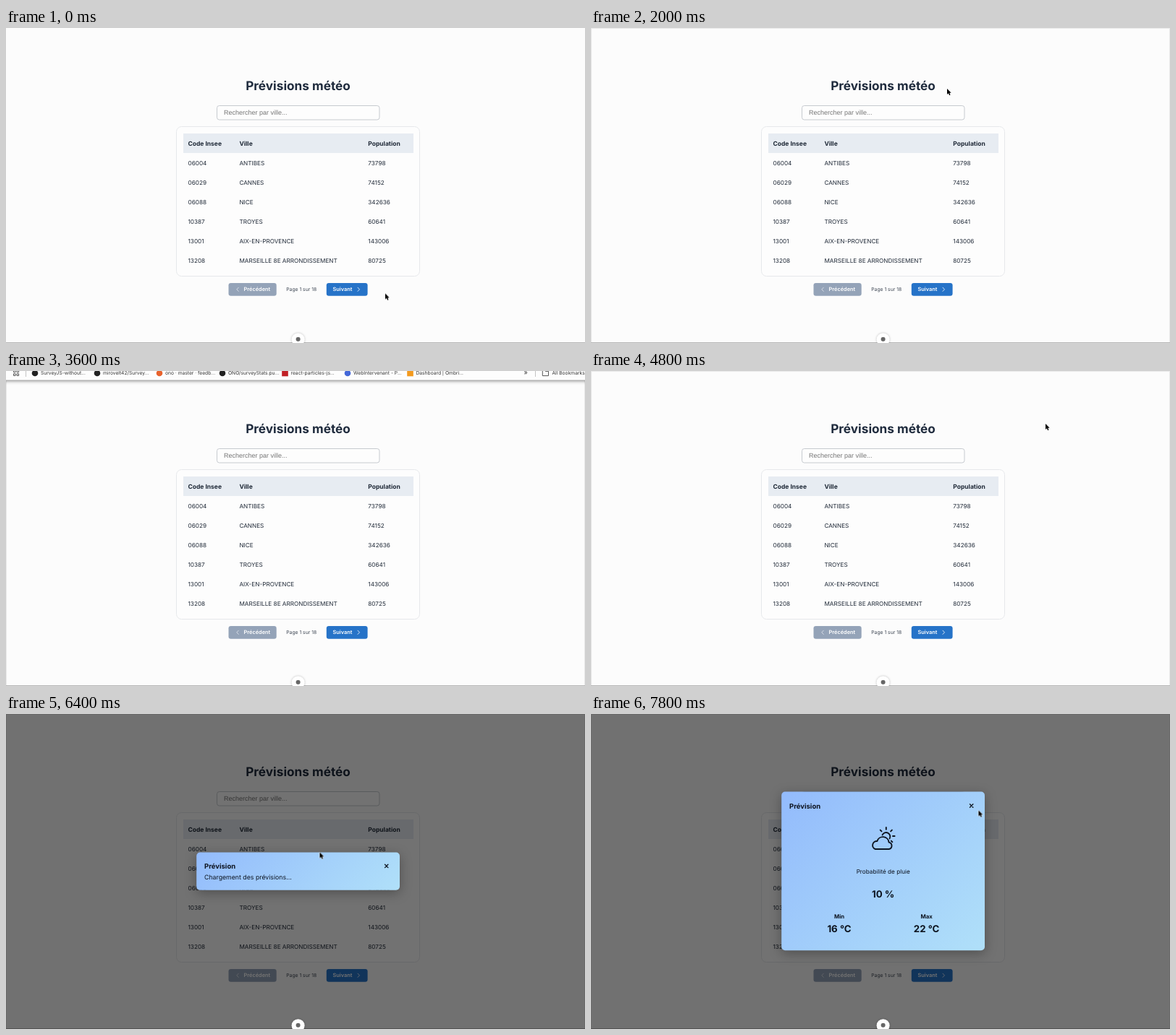
Animation, 800 px wide and 436 px high, one loop 8000 ms. Source, as an HTML page:

```html
<!DOCTYPE html>
<html lang="fr">
<head>
<meta charset="utf-8">
<title>Prévisions météo</title>
<style>
  html, body { margin: 0; width: 100%; height: 100%; overflow: hidden; background: #fcfcfc; }
  svg { display: block; width: 100vw; height: 100vh; }
  text { font-family: Inter, "Open Sans", sans-serif; font-size: 8.2px; fill: #202a38; text-rendering: geometricPrecision; }
  .mid { text-anchor: middle; }
  .title { font-size: 17.2px; font-weight: 700; fill: #1f2b3d; }
  .hint { font: 9px "Liberation Sans", Arial, sans-serif; fill: #757575; }
  .head { font-size: 8.5px; font-weight: 700; }
  .btn { font-size: 7.4px; font-weight: 600; fill: #fff; }
  .page { font-size: 6.8px; fill: #3d4653; }
  .bar text { font-size: 6.7px; fill: #333; }
  .modal text { fill: #0d1420; }
  .modal .name { font-size: 9.5px; font-weight: 700; }
  .modal .wait { font-size: 8.75px; }
  .modal .value { font-size: 13.3px; font-weight: 700; }
  .modal .label { font-size: 7.8px; font-weight: 700; }
  .modal rect { filter: drop-shadow(0 4px 8px rgba(0, 0, 0, .3)); }
  .line { fill: none; stroke-linecap: round; stroke-linejoin: round; }

  .edges, .hover, .hand, .arrow, .shade, .loading, .result, .bar { animation: 8s step-end infinite; }
  .edges { animation-name: edges; }
  .hover, .hand { animation-name: pointing; }
  .arrow { animation-name: arrow; }
  .shade { animation-name: shade; }
  .loading { animation-name: loading; }
  .result { animation-name: result; }
  .bar { animation-name: bar; }
  .cursor { animation: move 8s infinite; }

  @keyframes edges { 0% { opacity: 0 } 10%, 100% { opacity: 1 } }
  @keyframes pointing { 0% { opacity: 0 } 75% { opacity: 1 } 80%, 100% { opacity: 0 } }
  @keyframes arrow { 0% { opacity: 1 } 75% { opacity: 0 } 80%, 100% { opacity: 1 } }
  @keyframes shade { 0% { opacity: 0 } 80%, 100% { opacity: 1 } }
  @keyframes loading { 0% { opacity: 0 } 80% { opacity: 1 } 85%, 100% { opacity: 0 } }
  @keyframes result { 0% { opacity: 0 } 85%, 100% { opacity: 1 } }
  @keyframes bar {
    0% { transform: translateY(-24px) }
    45% { transform: translateY(0) }
    47.5% { transform: translateY(5px) }
    55% { transform: translateY(-7px) }
    57.5%, 100% { transform: translateY(-24px) }
  }
  /* the pointer advances once every 200 ms */
  @keyframes move {
    0% { transform: translate(524px, 367.5px); animation-timing-function: steps(1) }
    7.5% { transform: translate(524px, 367.5px); animation-timing-function: steps(7) }
    25% { transform: translate(492px, 84px); animation-timing-function: steps(2) }
    30% { transform: translate(300px, 70px); animation-timing-function: steps(3) }
    37.5% { transform: translate(535px, 62px); animation-timing-function: steps(3) }
    45% { transform: translate(620px, -14px); animation-timing-function: steps(1) }
    52.5% { transform: translate(620px, -14px); animation-timing-function: steps(3) }
    60% { transform: translate(628px, 73px); animation-timing-function: steps(7) }
    77.5% { transform: translate(433.5px, 191.5px); animation-timing-function: steps(1) }
    82.5% { transform: translate(433.5px, 191.5px); animation-timing-function: steps(6) }
    97.5%, 100% { transform: translate(535.5px, 133.5px) }
  }
</style>
</head>
<body>
<svg viewBox="0 0 800 436" preserveAspectRatio="none">
  <defs>
    <linearGradient id="small" gradientUnits="userSpaceOnUse" x1="320.5" y1="135" x2="486.5" y2="301">
      <stop stop-color="#93bbfc"/><stop offset="1" stop-color="#b0e0f9"/>
    </linearGradient>
    <linearGradient id="large" gradientUnits="userSpaceOnUse" x1="278.5" y1="92.5" x2="528.5" y2="342.5">
      <stop stop-color="#93bbfc"/><stop offset="1" stop-color="#b0e0f9"/>
    </linearGradient>
    <path id="close" class="line" d="M-2.2-2.2 2.2 2.2M2.2-2.2-2.2 2.2" stroke="#0d1420" stroke-width="1.3"/>
  </defs>

  <rect width="800" height="436" fill="#fcfcfc"/>
  <path class="edges" d="M.5 0V436M799.5 0V436M0 .5H800" fill="none" stroke="#e9e9e9"/>
  <path d="M0 435.5H800" stroke="#b4b4b4"/>

  <text class="title mid" x="403.5" y="86">Prévisions météo</text>
  <rect x="291.5" y="107.5" width="224.5" height="19.5" rx="3.2" fill="#fdfdfd" stroke="#c6cacf"/>
  <text class="hint" x="301" y="120.3">Rechercher par ville...</text>

  <rect x="235.5" y="136.5" width="336" height="207" rx="7" fill="#fdfdfd" stroke="#e6e8eb"/>
  <rect x="245" y="146" width="318" height="27" fill="#e7ecf2"/>
  <rect class="hover" x="245" y="173" width="318" height="27" fill="#f3f4f6"/>
  <g id="table"></g>

  <rect x="307.5" y="353" width="66.2" height="17.7" rx="3.2" fill="#94a3b8"/>
  <path class="line" d="M321.3 359.2 318.8 361.8 321.3 364.4" stroke="#e6eaf0" stroke-width=".8"/>
  <text class="btn" x="328.5" y="364.4">Précédent</text>
  <text class="page mid" x="408.2" y="364.2">Page 1 sur 18</text>
  <rect x="442.8" y="353" width="56.8" height="17.7" rx="3.2" fill="#2673c8"/>
  <text class="btn" x="451.5" y="364.4">Suivant</text>
  <path class="line" d="M486 359.2 488.5 361.8 486 364.4" stroke="#fff" stroke-width=".8"/>

  <g class="bar">
    <rect x="-5" y="-20" width="810" height="33" fill="#fdfdfd" stroke="#a9a9a9" style="filter: drop-shadow(0 1px 2px rgba(0,0,0,.35))"/>
    <path d="M10.5-1h2.6v2.6h-2.6zM15-1h2.6v2.6h-2.6zM10.5 3.8h2.6v2.6h-2.6zM15 3.8h2.6v2.6h-2.6z" fill="none" stroke="#444" stroke-width=".9"/>
    <path d="M27.5-2V8M731.5-2V8" stroke="#c4c4c4"/>
    <g id="marks"></g>
    <text x="715.5" y="5.2" style="font-size:9px">»</text>
    <path class="line" d="M741.3 6.2V-.8h3l1 1.2h4.2V6.2z" stroke="#444" stroke-width=".9"/>
    <text x="754.5" y="5.3">All Bookmarks</text>
  </g>

  <g class="shade">
    <rect width="800" height="436" fill="#000" fill-opacity=".55"/>
  </g>

  <g class="modal loading">
    <rect x="263.2" y="191.5" width="280.8" height="52.2" rx="5" fill="url(#small)"/>
    <text class="name" x="274" y="213.9">Prévision</text>
    <use href="#close" x="525.7" y="210.4"/>
    <text class="wait" x="274" y="229.2">Chargement des prévisions...</text>
  </g>

  <g class="modal result">
    <rect x="263.2" y="107.6" width="280.8" height="219.6" rx="5" fill="url(#large)"/>
    <text class="name" x="274" y="130.6">Prévision</text>
    <use href="#close" x="525.7" y="127"/>
    <g class="line" stroke="#0d1420" stroke-width="1.9">
      <path d="M392.8 187H411.8A4.8 4.8 0 0 0 411.6 177.6A8.3 8.3 0 0 0 395.4 176A5.7 5.7 0 0 0 392.8 187Z"/>
      <path d="M402.6 167.4A5.6 5.6 0 1 1 412.6 172.4"/>
      <path d="M407.8 157V159.8M399.7 160.6 401.5 162.4M415.9 160.6 414.1 162.4M417 169H419.6M414.8 175.6 416.4 177.2"/>
    </g>
    <text class="mid" x="403.7" y="221.3">Probabilité de pluie</text>
    <text class="value mid" x="403.6" y="254.4">10 %</text>
    <text class="label mid" x="343" y="282.8">Min</text>
    <text class="value mid" x="343" y="302">16 °C</text>
    <text class="label mid" x="463.6" y="282.8">Max</text>
    <text class="value mid" x="463.6" y="302">22 °C</text>
  </g>

  <g style="filter: drop-shadow(0 0 1.5px rgba(0,0,0,.25))">
    <circle cx="403.6" cy="431.2" r="9" fill="#fff"/>
  </g>
  <circle cx="403.6" cy="430.8" r="3" fill="#666"/>

  <g class="cursor">
    <path class="arrow" d="M0 0V8L1.9 6.3 3.1 9.2 4.5 8.6 3.3 5.8H5.7Z" fill="#000" stroke="#fff" stroke-width="1" paint-order="stroke"/>
    <path class="hand" transform="translate(-2 -1)" d="M1.2 1.2C.8 .2 2.2-.2 2.6 .8L3.8 3.8C4.4 3.2 5 3.4 5.2 3.9C5.8 3.4 6.4 3.6 6.6 4.2C7.3 3.9 7.8 4.3 7.8 5L7.6 8 6.6 10H3L.2 6.8C-.3 6 .8 5.4 1.4 6L2.2 6.6Z" fill="#fff" stroke="#111" stroke-width=".8" stroke-linejoin="round"/>
  </g>
</svg>
<script>
  const NS = "http://www.w3.org/2000/svg";
  const add = (parent, tag, attrs, text = "") => {
    const el = document.createElementNS(NS, tag);
    for (const key in attrs) el.setAttribute(key, attrs[key]);
    el.textContent = text;
    parent.append(el);
  };

  const columns = [251.5, 322.4, 500.3];
  const rows = [
    ["Code Insee", "Ville", "Population"],
    ["06004", "ANTIBES", "73798"],
    ["06029", "CANNES", "74152"],
    ["06088", "NICE", "342636"],
    ["10387", "TROYES", "60641"],
    ["13001", "AIX-EN-PROVENCE", "143006"],
    ["13208", "MARSEILLE 8E ARRONDISSEMENT", "80725"],
  ];
  const table = document.getElementById("table");
  rows.forEach((row, i) => row.forEach((cell, j) =>
    add(table, "text", { x: columns[j], y: 162.5 + 27 * i, class: i ? "" : "head" }, cell)));

  const bookmarks = [
    [40, "circle", "#222", "SurveyJS-without..."],
    [126, "circle", "#222", "mirovelt42/Survey..."],
    [212, "circle", "#e8622c", "ono · master · feedb..."],
    [299, "circle", "#222", "ONO/surveyStats.pu..."],
    [385.5, "rect", "#c12127", "react-particles-js..."],
    [472, "circle", "#4468d8", "WebIntervenant - P..."],
    [558.5, "rect", "#f39a1e", "Dashboard | Ombri..."],
  ];
  const marks = document.getElementById("marks");
  for (const [x, shape, fill, label] of bookmarks) {
    add(marks, shape, shape === "circle"
      ? { cx: x, cy: 3, r: 4.3, fill }
      : { x: x - 4.3, y: -1.3, width: 8.6, height: 8.6, fill });
    add(marks, "text", { x: x + 8, y: 5.3 }, label);
  }
</script>
</body>
</html>
```
